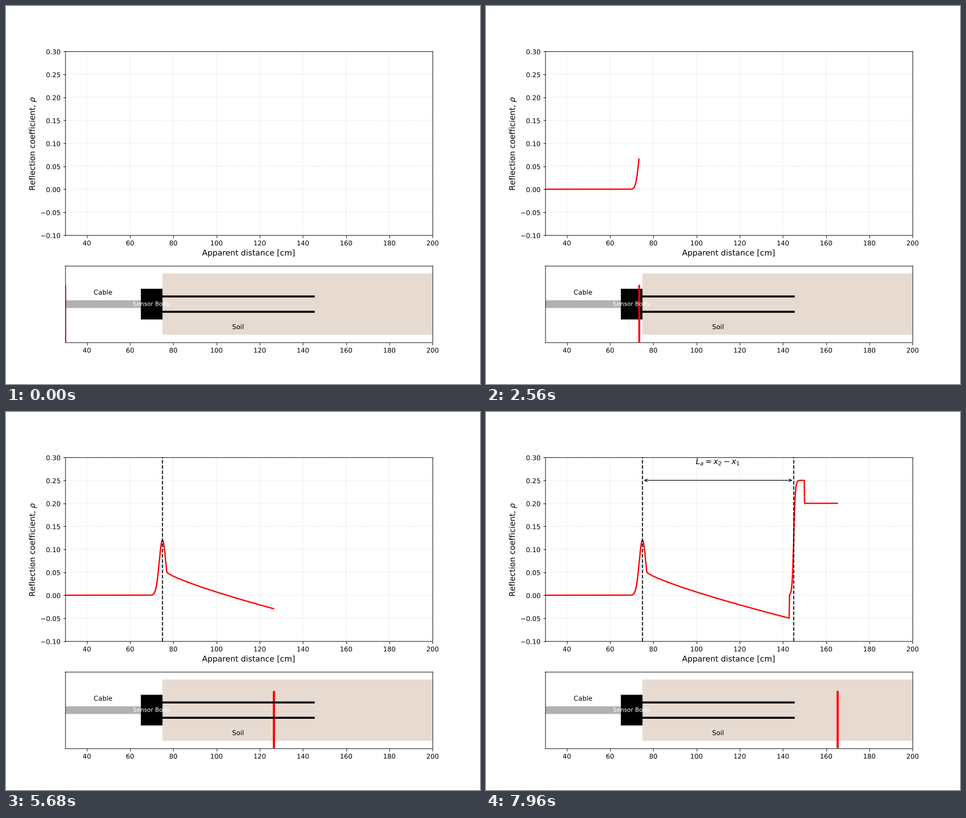
Recreate the animation shown at these times as a matplotlib script. Size 837 px wide and 669 px high, loop 8000 ms.

```python
import numpy as np
import matplotlib.pyplot as plt
from matplotlib.animation import FuncAnimation
from matplotlib.patches import FancyArrow, Rectangle
from matplotlib.patheffects import Normal

W, H, DPI = 837, 669, 83.7
FRAMES, INTERVAL = 200, 40
X_MIN, X_MAX = 30, 200
PROBE_START, PROBE_END = 75, 145
DX = 0.17          # sample spacing in cm
PER_FRAME = 4      # samples added per frame
NUDGE = 0.36       # points the frame lines sit right of and below the axes box


def reflection(x):
    """Reflection coefficient along the apparent distance."""
    peak = 0.12 * np.exp(-0.5 * ((x - PROBE_START) / 1.5) ** 2)
    decay = 0.05 - 0.1 * (np.clip(x - 77, 0, None) / 66) ** 0.8
    rise = 0.25 / (1 + np.exp(-2.7 * (x - PROBE_END)))
    return np.select([x < 77, x < 143, x < 150], [peak, decay, rise], 0.2)


xs = X_MIN + DX * np.arange(1000)
ys = reflection(xs)

# Soft, unsnapped lines and outline text keep sub-pixel positions
plt.rcParams.update({"font.family": "DejaVu Sans", "path.snap": False,
                     "path.effects": [Normal()]})
fig = plt.figure(figsize=(W / DPI, H / DPI), dpi=DPI, facecolor="white")
unit = 0.77 / 19


def panel(bottom, rows):
    ax = fig.add_axes([0.125, 0.11 + bottom * unit, 0.775, rows * unit])
    for side, sign in dict(left=-1, right=1, bottom=1, top=-1).items():
        ax.spines[side].set_position(("outward", sign * NUDGE))
    ax.tick_params(axis="x", pad=3.5 - NUDGE)
    ax.tick_params(axis="y", pad=3.5 + NUDGE)
    return ax


top = panel(7, 12)
low = panel(0, 5)

# Waveform plot
top.set(xlim=(X_MIN, X_MAX), ylim=(-0.10, 0.30))
top.set_xlabel("Apparent distance [cm]", fontsize=12, labelpad=3.3)
top.set_ylabel(r"Reflection coefficient, $\rho$", fontsize=12)
top.grid(True, linestyle=":", alpha=0.6)
curve, = top.plot([], [], color="red", lw=2)
start_line = top.axvline(PROBE_START, color="black", ls="--", lw=1.5)
end_line = top.axvline(PROBE_END, color="black", ls="--", lw=1.5)
span = top.annotate("", xy=(PROBE_START, 0.25), xytext=(PROBE_END, 0.25),
                    arrowprops=dict(arrowstyle="<->", color="black"))
span_label = top.text(110, 0.28, r"$L_a = x_2 - x_1$", fontsize=12,
                      ha="center", va="bottom")

# Sensor sketch
low.set(xlim=(X_MIN, X_MAX), ylim=(0, 1), yticks=[])


def box(x0, x1, y0, y1, color):
    low.add_patch(Rectangle((x0, y0), x1 - x0, y1 - y0, fc=color, ec="none"))


def label(x, y, text, **style):
    low.text(x, y, text, ha="center", va="center", **style)


box(PROBE_START, X_MAX, 0.1, 0.9, "#e7dad0")
box(X_MIN, 65, 0.45, 0.55, "#b1b1b1")
box(65, PROBE_START, 0.3, 0.7, "black")
for y in (0.4, 0.6):
    low.plot([PROBE_START, PROBE_END], [y, y], color="black", lw=3)
label(47.5, 0.65, "Cable", fontsize=10)
label(70, 0.5, "Sensor Body", fontsize=9, color="white")
label(110, 0.2, "Soil", fontsize=10)
front = FancyArrow(X_MIN, 0, 0, 0.75, width=0.1, head_width=0.12,
                   head_length=0.1, length_includes_head=True,
                   fc="red", ec="red", lw=2.5)
low.add_patch(front)


def update(i):
    n = i * PER_FRAME
    x = xs[n]
    curve.set_data(xs[:n], ys[:n])
    front.set_data(x=x)
    start_line.set_visible(x >= PROBE_START)
    for artist in (end_line, span, span_label):
        artist.set_visible(x >= PROBE_END)
    return curve, front, start_line, end_line, span, span_label


anim = FuncAnimation(fig, update, frames=FRAMES, interval=INTERVAL,
                     init_func=lambda: update(0), repeat=True, repeat_delay=0)
plt.show()
```
